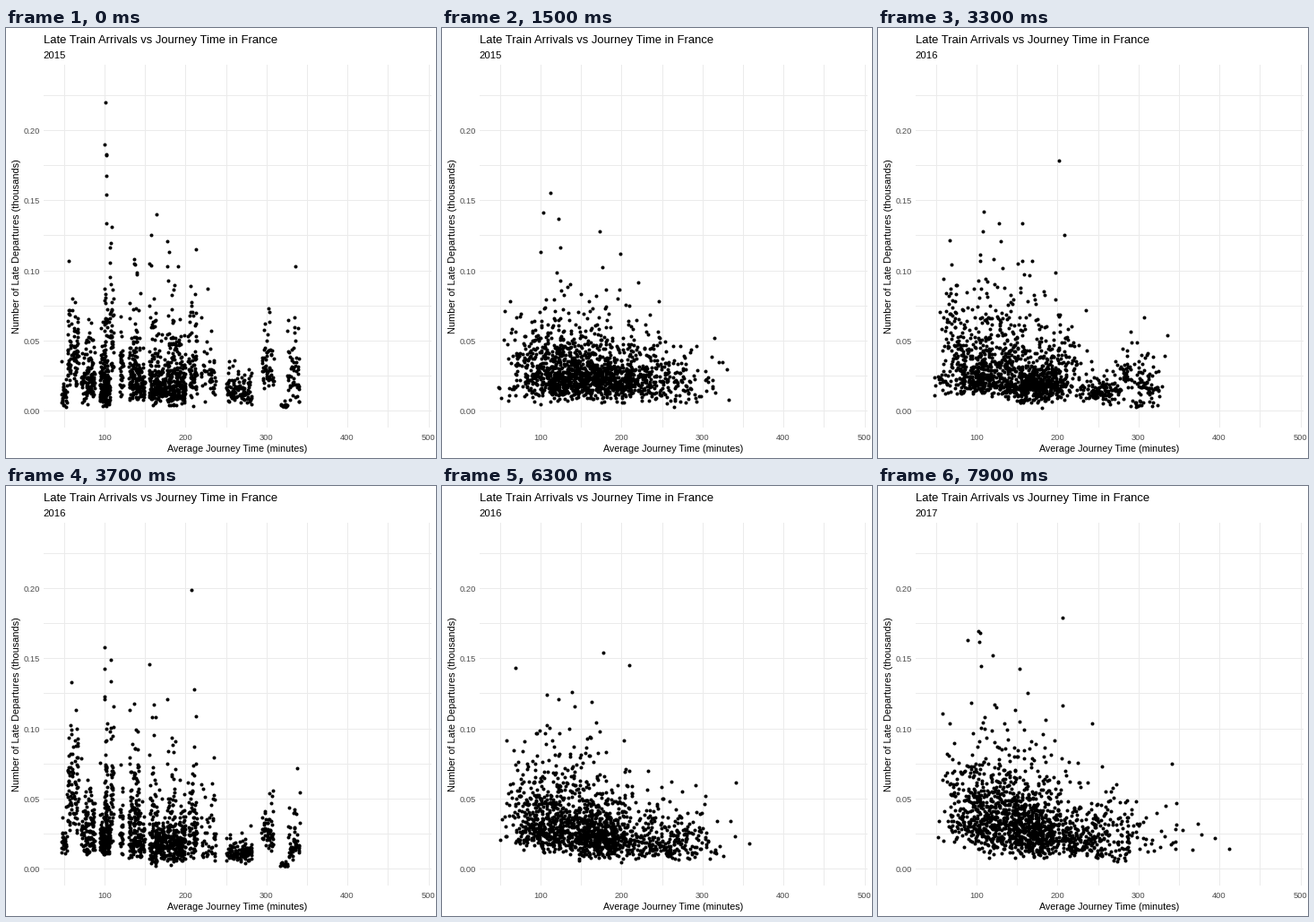
Write a matplotlib script that moves like this. It is 480x480 px and loops after 8000 ms.

```python
import numpy as np
import matplotlib.pyplot as plt
from matplotlib.animation import FuncAnimation

SIZE = 480
LEFT, RIGHT, TOP, BOTTOM = 42, 474, 41, 445
STEP, STEPS = 200, 17           # ms per step, steps per year change
STARTS = (500, 5700)
INTERVAL = 100
FIRST_YEAR = 2015

plt.rcParams["font.family"] = "Liberation Sans"
rng = np.random.default_rng(7)

# Groups of routes: shortest and longest time, count, median and peak delays
ROUTES = [
    (47, 54, 30, .014, .035), (54, 68, 90, .043, .107),
    (71, 88, 120, .023, .065), (94, 107, 150, .019, .065),
    (100, 103, 50, .045, .22), (107, 111, 40, .05, .131),
    (119, 123, 35, .026, .067), (130, 144, 150, .028, .108),
    (144, 150, 35, .018, .045), (155, 164, 85, .024, .14),
    (163, 176, 105, .019, .055), (177, 189, 135, .022, .121),
    (189, 200, 110, .018, .065), (203, 214, 75, .033, .115),
    (219, 237, 46, .024, .087), (250, 282, 110, .014, .036),
    (294, 309, 55, .035, .073), (317, 326, 16, .004, .007),
    (326, 341, 52, .026, .103),
]
LONG_ROUTES = (405, 462, 18, .018, .035)

# Striking points, one place per year
KEY_POINTS = np.array([
    [(101, .22), (132, .036), (150, .03)],
    [(102, .183), (304, .026), (270, .03)],
    [(166, .025), (207, .1985), (80, .01)],
    [(191, .103), (211, .128), (205, .2)],
    [(300, .05), (341, .0545), (341, .083)],
])


def to_x(minutes):
    return 109.92 + (minutes - 100) * .904


def to_y(thousands):
    return 427.2 - thousands * 1566


def group(lo, hi, n, median, peak):
    """Log-normal delays whose highest value is the peak."""
    z = rng.normal(size=n)
    y = median * (peak / median) ** (z / z.max())
    return np.column_stack([rng.uniform(lo, hi, n), np.maximum(y, .002)])


def year_points(base, slope, limit, extra=()):
    """One year in random order; short routes are delayed more."""
    parts = [group(*e) for e in extra]
    for lo, hi, n, median, peak in ROUTES:
        rise = base - slope * lo / 100
        parts.append(group(lo, hi, n, median * rise, min(peak * rise, limit)))
    return rng.permutation(np.concatenate(parts))


def build_years():
    years = [year_points(1, 0, .19),
             year_points(1.35, .2, .158),
             year_points(1.75, .25, .215, [LONG_ROUTES])]
    n = min(map(len, years))
    return np.stack([np.concatenate([KEY_POINTS[:, i], y[:n]])
                     for i, y in enumerate(years)])


YEARS = build_years()

# Axes in pixels, y down
fig = plt.figure(figsize=(SIZE / 72, SIZE / 72), dpi=72, facecolor="white")
ax = fig.add_axes([0, 0, 1, 1])
ax.set_xlim(0, SIZE)
ax.set_ylim(SIZE, 0)
ax.axis("off")


def put(x, y, text, size, color="black", **kw):
    return ax.text(x, y, text, size=size, color=color, **kw)


def grid_line(xs, ys):
    ax.plot(xs, ys, color="#EBEBEB", lw=1, antialiased=False, zorder=0)


for v in range(50, 501, 50):
    x = to_x(v)
    grid_line([x, x], [TOP, BOTTOM])
    if v % 100 == 0:
        put(x, 459.5, str(v), 9.4, "#4D4D4D", ha="center")
for i in range(10):
    y = to_y(i * .025)
    grid_line([LEFT, RIGHT], [y, y])
    if i % 2 == 0:
        put(37.5, y + 4, f"{i * .025:.2f}", 9.4, "#4D4D4D", ha="right")

put(42, 17, "Late Train Arrivals vs Journey Time in France", 13)
put(257.7, 473, "Average Journey Time (minutes)", 10.8, ha="center")
put(17.5, 244, "Number of Late Departures (thousands)", 11,
    rotation=90, ha="right", va="center")
year = put(41.5, 34, str(FIRST_YEAR), 11.2)
dots, = ax.plot([], [], "o", color="black", ms=4, mew=0, antialiased=False)


def progress(ms):
    """Years passed since the first one."""
    done = [min(max((ms - s) // STEP + 1, 0), STEPS) for s in STARTS]
    return sum(done) / STEPS


def update(i):
    p = progress(i * INTERVAL)
    k = min(int(p), 1)
    pts = YEARS[k] + (YEARS[k + 1] - YEARS[k]) * (p - k)
    dots.set_data(to_x(pts[:, 0]), to_y(pts[:, 1]))
    year.set_text(str(FIRST_YEAR + int(p + .5)))
    return dots, year


anim = FuncAnimation(fig, update, frames=80, interval=INTERVAL, repeat=True,
                     repeat_delay=0, blit=False)
plt.show()
```
